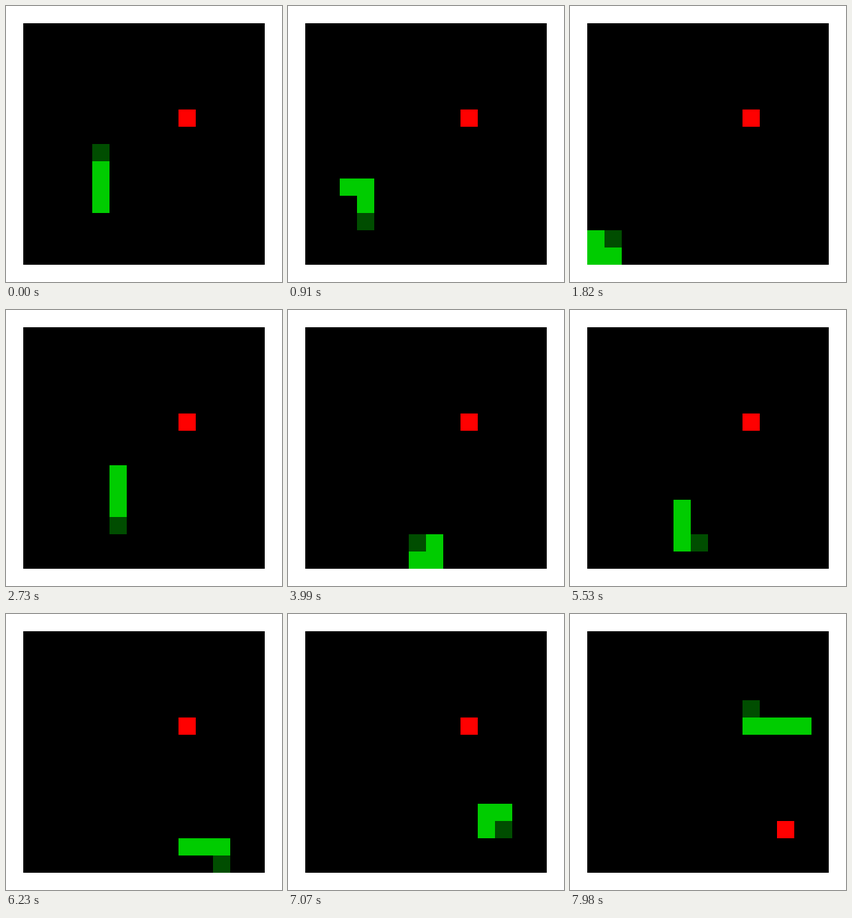
Animation of 432 by 432 pixels, one loop 8 s. Source, as an HTML page with a canvas:

```html
<!DOCTYPE html>
<html lang="en">
<head>
<meta charset="utf-8">
<title>Snake</title>
<style>
  html, body { margin: 0; width: 100%; height: 100%; overflow: hidden; background: #fff; }
  canvas { display: block; }
</style>
</head>
<body>
<canvas id="stage" width="432" height="432"></canvas>
<script>
const CELL = 27, STEP = 70, LOOP = 8000;
const START_LENGTH = 4, EATEN_AT = 113;
const COLORS = { board: '#000', head: '#004d00', body: '#00cc00', food: '#f00' };
const MOVES = { U: [0, -1], D: [0, 1], L: [-1, 0], R: [1, 0] };

// Route of the head: direction and number of cells, from the first tail cell.
const ROUTE = 'U4 L4 D3 R3 D2 L3 D1 R3 D1 L3 U1 R4 U5 R1 D5 R2 U1 L1 U1 R2 D1 R1 D2 ' +
  'L1 U1 L1 D1 L1 U3 L1 U4 L3 D5 R2 U1 R1 D2 R1 D1 R1 U2 R1 D1 R3 D1 R2 U1 L2 D1 L1 ' +
  'U3 R1 D1 R2 U4 L1 U2 L3 U1';

const trail = [[5, 11]];
for (const [dir, ...count] of ROUTE.split(' ')) {
  const [dx, dy] = MOVES[dir];
  for (let i = 0; i < Number(count.join('')); i++) {
    const [x, y] = trail[trail.length - 1];
    trail.push([x + dx, y + dy]);
  }
}

const ctx = document.getElementById('stage').getContext('2d');

function fillCell([x, y], color) {
  ctx.fillStyle = color;
  ctx.fillRect(x * CELL, y * CELL, CELL, CELL);
}

function draw(step) {
  const eaten = step >= EATEN_AT;
  const length = START_LENGTH + (eaten ? 1 : 0);
  const head = step + START_LENGTH - 1;

  ctx.fillStyle = '#fff';
  ctx.fillRect(0, 0, 432, 432);
  ctx.fillStyle = COLORS.board;
  ctx.fillRect(CELL, CELL, 14 * CELL, 14 * CELL);
  fillCell(eaten ? [12, 12] : [10, 6], COLORS.food);
  for (let i = head - length + 1; i < head; i++) fillCell(trail[i], COLORS.body);
  fillCell(trail[head], COLORS.head);
}

let start;
function tick(now) {
  start ??= now;
  const time = Math.max(0, now - start) % LOOP;
  draw(Math.floor(time / STEP + 1e-6));
  requestAnimationFrame(tick);
}

draw(0);
requestAnimationFrame(tick);
</script>
</body>
</html>
```
